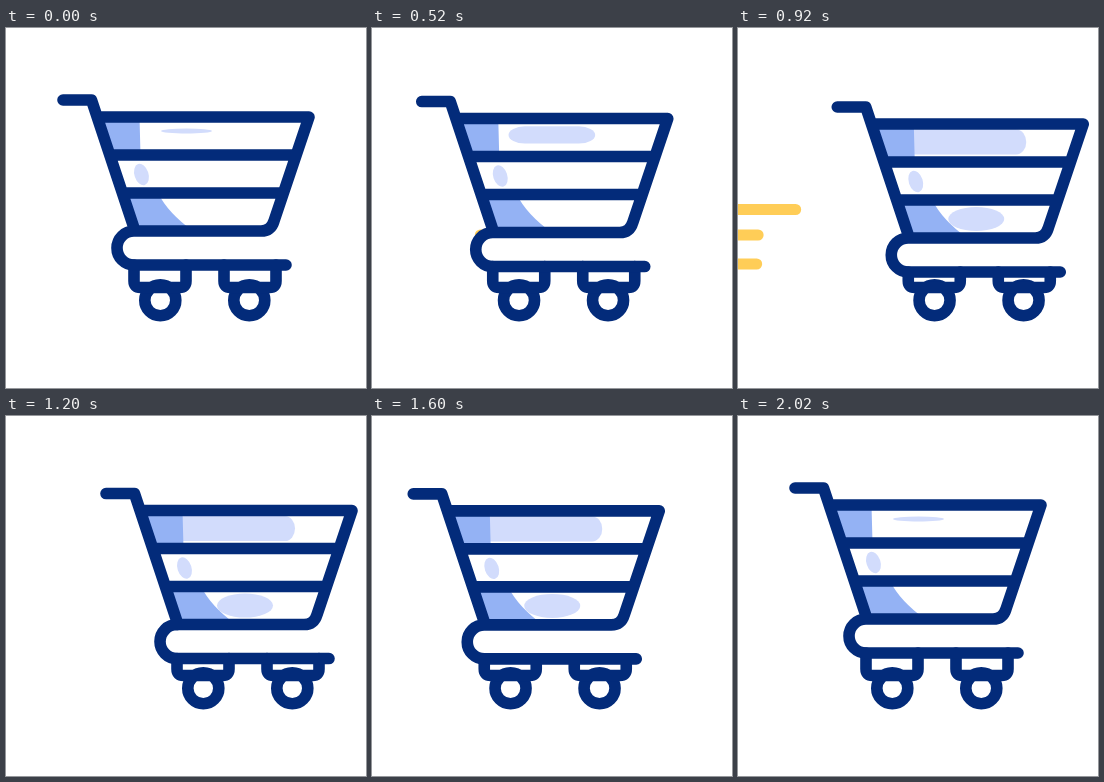
Recreate the animation shown at these times as an HTML page. Size 360x360 px, loop 2.16 s.

```html
<!DOCTYPE html>
<html lang="en">
<head>
<meta charset="utf-8">
<title>Shopping cart</title>
<style>
  html, body { margin: 0; width: 100%; height: 100%; overflow: hidden; background: #fff; }
  svg { display: block; width: 100vw; height: 100vh; }
  .line { fill: none; stroke: #032b7a; stroke-width: 11.6; stroke-linecap: round; stroke-linejoin: round; }
  .shade { fill: #94b2f4; }
  .light { fill: #d2dcfc; }
  .speed { stroke: #ffcd57; stroke-width: 11; stroke-linecap: round; }
</style>
</head>
<body>
<svg viewBox="0 0 360 360">
  <g id="trails">
    <line class="speed" y1="181.5" y2="181.5"/>
    <line class="speed" y1="207" y2="207"/>
    <line class="speed" y1="236" y2="236"/>
  </g>
  <g id="cart">
    <circle class="line" cx="154.3" cy="272.3" r="15.5"/>
    <circle class="line" cx="243.3" cy="272.3" r="15.5"/>
    <path id="brackets" class="line"/>
    <g id="body">
      <rect id="gloss" class="light"/>
      <ellipse id="glow" class="light" cx="196" cy="184" ry="12"/>
      <ellipse class="light" cx="135.5" cy="146.5" rx="7" ry="11" transform="rotate(-18 135.5 146.5)"/>
      <path class="shade" d="M92 89H133.5L134.5 127H104ZM117 165H152Q162 185 187 203H128Z"/>
      <path class="line" d="M57 72H85.5L129 203M92 89H303L268 193Q265 203 255 203H128A17 17 0 0 0 128 237H280M107 127H288M119 165H277"/>
    </g>
  </g>
</svg>
<script>
const LOOP = 2160, STEP = 20;
const $ = id => document.getElementById(id);
const lerp = (a, b, k) => a + (b - a) * k;
const clamp = k => Math.min(1, Math.max(0, k));
const wave = k => (1 - Math.cos(Math.PI * k)) / 2;
// Soft start and a long slow finish.
const glide = power => k => wave(1 - (1 - k) ** power);

// The cart backs up, darts forward, rolls back and settles.
const LEGS = [
  { from: 220, to: 415, x: -22, ease: wave },
  { from: 415, to: 1215, x: 43, ease: glide(2.7) },
  { from: 1215, to: 1475, x: -22, ease: wave },
  { from: 1475, to: 2020, x: 0, ease: glide(1.7) }
];

const slide = t => LEGS.reduce(
  (x, leg) => lerp(x, leg.x, leg.ease(clamp((t - leg.from) / (leg.to - leg.from)))), 0);

// Five bounces, each a little slower than the one before.
function bounce(t) {
  const u = clamp((t - 220) / 1800);
  const turns = Math.min(5, u * (7.27 - 2.05 * u));
  return 7 * Math.sin(Math.PI * turns) ** 2;
}

const SPEED = 0.42, HOLD = 190;
const TRAILS = [{ x: 82, born: 672 }, { x: 110, born: 516 }, { x: 82.5, born: 578 }];

const set = (el, attrs) => {
  for (const name in attrs) el.setAttribute(name, attrs[name]);
};

const bracket = (x, top) =>
  `M${x} ${top}V253Q${x} 259.5 ${x + 6.5} 259.5H${x + 45.5}Q${x + 52} 259.5 ${x + 52} 253V${top}`;

// The reflection swells as the body sinks.
function drawGloss(dy) {
  const g = clamp(dy / 2.5);
  const left = 155 - 30 * g * g, right = 206 + 40 * g;
  const half = 2.5 + 10 * g;
  set($("gloss"), {
    x: left, width: right - left,
    y: 103 + 4 * g - half, height: 2 * half,
    rx: lerp(26, 10, g), ry: half
  });
  set($("glow"), { rx: 28 * clamp(dy - 4) });
}

function drawTrails(t) {
  TRAILS.forEach(({ x, born }, i) => {
    const age = t - born;
    const head = x - SPEED * age;
    const tail = x - SPEED * Math.max(0, age - HOLD);
    const line = $("trails").children[i];
    line.style.display = age >= 0 && tail > -10 ? "" : "none";
    set(line, { x1: head, x2: tail });
  });
}

function draw(t) {
  const dy = bounce(t);
  set($("cart"), { transform: `translate(${slide(t)} 0)` });
  set($("body"), { transform: `translate(0 ${dy})` });
  set($("brackets"), { d: bracket(128, 237 + dy) + bracket(218, 237 + dy) });
  drawGloss(dy);
  drawTrails(t);
}

const start = performance.now();
function tick() {
  const t = (performance.now() - start) % LOOP;
  draw(Math.floor(t / STEP) * STEP);
  requestAnimationFrame(tick);
}
tick();
</script>
</body>
</html>
```
